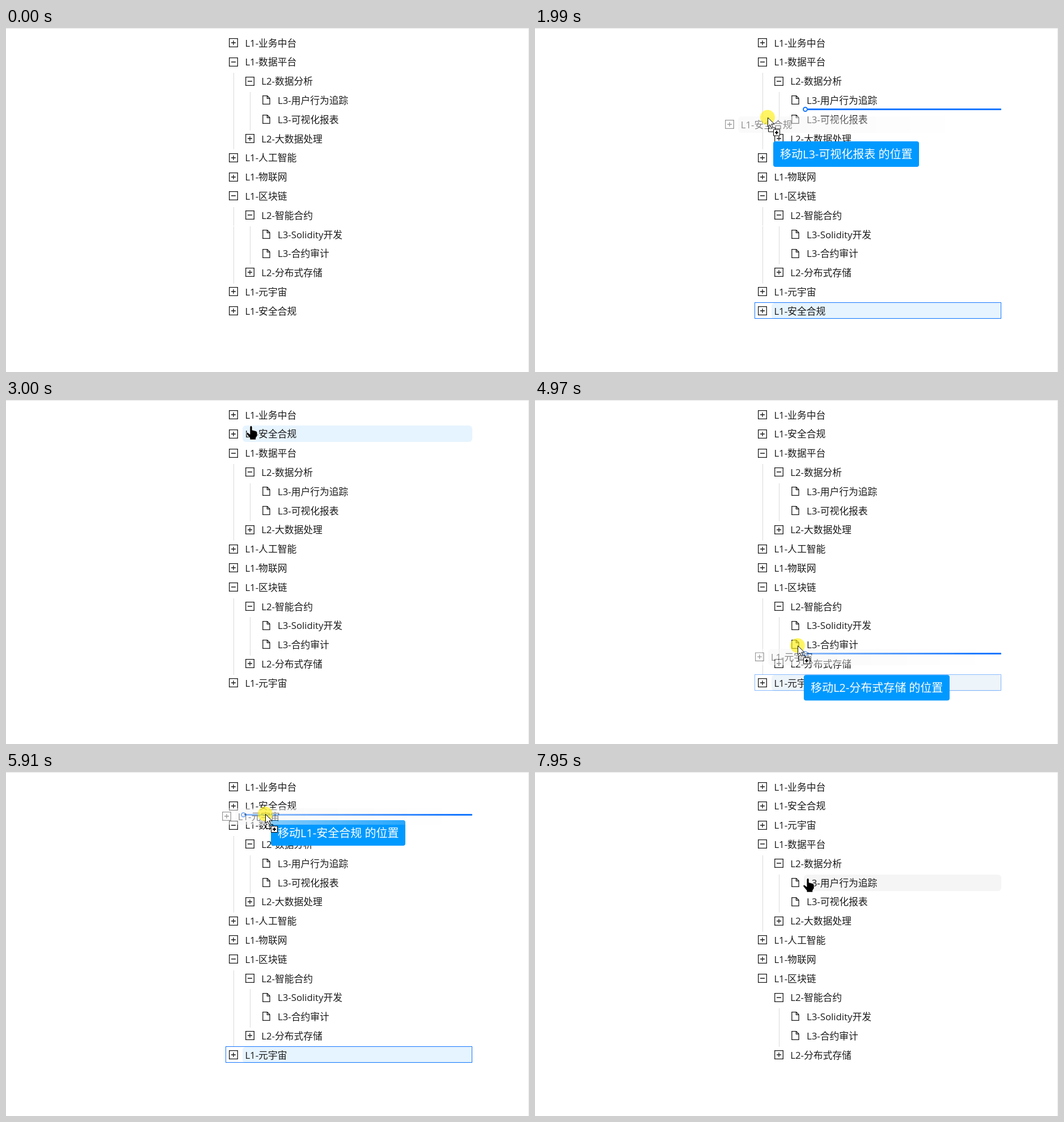
An HTML page that plays this animation: 922x607 px, repeating every 8 s.

```html
<!DOCTYPE html>
<html lang="zh-CN">
<head>
<meta charset="utf-8">
<title>Tree drag and drop</title>
<style>
html, body { margin: 0; width: 100%; height: 100%; overflow: hidden; background: #fff; }
#stage {
  position: relative; width: 922px; height: 607px; overflow: hidden; box-sizing: border-box;
  border-top: 1px solid #e4e4e4; border-right: 1px solid #e8e8e8;
  color: #1a1a1a; font: 16.8px/29px "Open Sans", "Noto Sans CJK SC", "Noto Sans CJK", sans-serif;
  white-space: nowrap;
}
#layer { position: absolute; left: 0; top: -1px; width: 922px; height: 607px; }
#layer div, #layer svg { position: absolute; }
.row { left: 387.6px; width: 434.4px; height: 33.79px; --in: calc(var(--d) * 28.8px); }
.title { left: calc(29px + var(--in)); right: 0; height: 29px; padding-left: 4.8px; border-radius: 6px; box-sizing: border-box; }
.icon { left: calc(5.9px + var(--in)); top: 6.4px; width: 16px; height: 16px; fill: none; stroke: #1a1a1a; stroke-width: 1.3; }
.guide { width: 1px; top: 0; height: 100%; background: #d9d9d9; }
#frame { left: 387px; top: 484px; width: 435px; height: 29px; box-sizing: border-box; border: 1px solid #1677ff; }
#line { height: 3px; right: 100px; background: #1677ff; border-radius: 1px; }
#line::before {
  content: ""; position: absolute; left: -8px; top: -3px; width: 5px; height: 5px;
  border: 2px solid #1677ff; border-radius: 50%;
}
#tip {
  left: 0; top: 0; height: 45px; padding: 0 12px; border-radius: 4px;
  background: #09f; color: #fff; font-size: 20px; line-height: 45px;
}
#ghost {
  left: -14px; top: -14.4px; width: 434px; height: 29px; background: #fff;
  -webkit-mask-image: radial-gradient(circle at 84px 14px, rgba(0,0,0,.56), transparent 340px);
  mask-image: radial-gradient(circle at 84px 14px, rgba(0,0,0,.56), transparent 340px);
}
#ghost .title { background: #f5f5f5; }
#spot { left: -13px; top: -13px; width: 26px; height: 26px; border-radius: 50%; background: rgba(255,240,20,.66); }
#cursor { left: 0; top: 0; width: 1px; height: 1px; overflow: visible; }
</style>
</head>
<body>
<div id="stage"><div id="layer">
  <div id="tree"></div>
  <div id="frame"></div>
  <div id="line"></div>
  <div id="tip"></div>
  <div id="ghost" class="row" style="--d:0"></div>
  <div id="spot"></div>
  <svg id="cursor">
    <g id="arrow" fill="#fff" stroke="#000">
      <path d="M.5 .5V16.5L4.2 13L6.8 19L9.4 17.9L6.9 12H12Z"/>
    </g>
    <g id="badge" fill="#fff" stroke="#000">
      <path fill="none" d="M4 18.5H1.5V25.5H10M10 18.5H13.5V21"/>
      <path d="M10.5 21.5h11v11h-11z"/>
      <path stroke-width="2" d="M13 27h6M16 24v6"/>
    </g>
    <path id="hand" stroke="#fff" stroke-width=".7"
      d="M-2 2Q-2 -.5 0 -.5Q2 -.5 2 2V7L8 8.5Q11 9.5 11 12V17L8.5 21V24H-2V21L-8 14Q-9 11 -6 11.3L-2 14.5Z"/>
  </svg>
</div></div>
<script>
const LOOP = 8000, PITCH = 33.79, MID = 26, INDENT = 28.8;
const $ = id => document.getElementById(id);

const ICONS = {
  '+': 'M.7 .7H15.3V15.3H.7ZM4 8H12M8 4V12',
  '-': 'M.7 .7H15.3V15.3H.7ZM4 8H12',
  'f': 'M1.8 .7H9.6L14 5.1V15.3H1.8ZM9.4 .7V5.3H14'
};
const cell = (icon, label) =>
  `<svg class="icon" viewBox="0 0 16 16"><path d="${ICONS[icon]}"/></svg><div class="title">${label}</div>`;

// depth, icon, label
const rows = `0+业务中台
0-数据平台
1-数据分析
2f用户行为追踪
2f可视化报表
1+大数据处理
0+人工智能
0+物联网
0-区块链
1-智能合约
2fSolidity开发
2f合约审计
1+分布式存储
0+元宇宙
0+安全合规`.split('\n').map(s => {
  const depth = +s[0], label = `L${depth + 1}-${s.slice(2)}`, el = document.createElement('div');
  el.className = 'row';
  el.style.setProperty('--d', depth);
  el.innerHTML = cell(s[1], label);
  for (let i = 0; i < depth; i++)
    el.insertAdjacentHTML('afterbegin', `<div class="guide" style="left:${13.4 + i * INDENT}px"></div>`);
  $('tree').append(el);
  return { depth, label, el, title: el.querySelector('.title'), root: el.querySelectorAll('.guide')[depth - 1] };
});

const move = (list, from, to) => {
  const out = [...list];
  out.splice(to, 0, ...out.splice(from, 1));
  return out;
};
const second = move(rows, 14, 1);
const orders = [rows, second, move(second, 14, 2)];
const drags = [
  { start: 1350, fade: 1560, drop: 3000, row: rows[14] },
  { start: 4760, fade: 4820, drop: 6170, row: rows[13] }
];

// each key: time, x, y
const pointer = [
  [120, 660, 612], [500, 560, 556], [880, 478, 512], [940, 478, 512], [1080, 471, 505], [1350, 471, 505],
  [1440, 458, 477], [1610, 420, 365], [1850, 408, 215], [2130, 412, 101], [2200, 415, 95], [2400, 431, 57],
  [2600, 432, 46], [3080, 432, 46], [3400, 440, 270], [3760, 462, 499], [3900, 470, 497], [4760, 470, 497],
  [4880, 467, 475], [4970, 463, 434], [5200, 442, 250], [5510, 447, 110], [5570, 449, 100], [5910, 457, 74],
  [6600, 457, 74], [6980, 445, 90], [7200, 440, 200], [7450, 530, 335], [7740, 490, 255], [7820, 484, 244],
  [7950, 481, 188]
];
const ghost = [
  [1350, 401, 499], [1470, 390, 470], [1610, 358, 399], [1850, 342, 240], [2130, 344, 101], [2400, 361, 50],
  [2600, 362, 40], [4760, 401, 499], [4880, 398, 485], [4970, 396, 454], [5200, 374, 270], [5510, 379, 118],
  [5570, 381, 105], [5910, 389, 78]
];
const tip = [
  [1640, 430, 405], [1850, 418, 270], [2130, 422, 131], [2400, 441, 81], [2600, 442, 71], [4850, 480, 510],
  [4970, 474, 486], [5200, 452, 300], [5510, 457, 125], [5570, 459, 118], [5910, 467, 85]
];

const clamp = v => Math.max(0, Math.min(1, v));
function at(keys, t) {
  let i = keys.findIndex(k => k[0] > t);
  if (i < 0) i = keys.length;
  const a = keys[Math.max(0, i - 1)], b = keys[Math.min(i, keys.length - 1)];
  const k = b[0] > a[0] ? clamp((t - a[0]) / (b[0] - a[0])) : 0;
  return [a[1] + (b[1] - a[1]) * k, a[2] + (b[2] - a[2]) * k];
}
const GREY = [245, 245, 245], BLUE = [230, 244, 255], WHITE = [255, 255, 255];
const mix = (a, b, k) => `rgb(${a.map((v, i) => Math.round(v + (b[i] - v) * k))})`;
const place = (id, [x, y]) => { $(id).style.transform = `translate(${x}px,${y}px)`; };
const show = (id, on) => { $(id).style.display = on ? '' : 'none'; };
const rowAt = y => Math.round((y - MID) / PITCH);

let shown = null;
function layout(order) {
  if (order === shown) return;
  shown = order;
  const lastRoot = order.map(r => r.depth).lastIndexOf(0);
  order.forEach((r, i) => {
    r.el.style.top = MID - 14.4 + i * PITCH + 'px';
    if (r.root) r.root.style.visibility = '';
    const base = r.el.querySelector('.guide[style*="13.4px"]');
    if (base) base.style.visibility = i > lastRoot ? 'hidden' : '';
  });
}

function draw(t) {
  const order = orders[drags.filter(d => t >= d.drop).length];
  layout(order);

  const pos = at(pointer, t), [x, y] = pos;
  const drag = drags.find(d => t >= d.start && t < d.drop);
  const under = order[rowAt(y)];
  const hover = under && x >= 416 + under.depth * INDENT && x < 822 ? under : null;

  rows.forEach(r => { r.title.style.background = !drag && r === hover ? mix(GREY, GREY, 0) : ''; });
  drags.forEach(d => {
    const k = (t - d.drop) / 250;
    if (k >= 0 && k < 1) d.row.title.style.background = mix(BLUE, d.row === hover ? GREY : WHITE, k);
  });

  const fade = drag ? clamp((t - drag.fade) / 300) : 0;
  const over = !!drag && t > drag.fade + 80;
  show('frame', fade > 0);
  show('line', over);
  show('tip', over);
  show('ghost', drag);
  show('spot', drag);
  if (drag) {
    drag.row.title.style.background = mix(GREY, BLUE, fade);
    $('frame').style.opacity = fade;
    place('ghost', at(ghost, t));
    place('spot', pos);
    const html = cell('+', drag.row.label);
    if ($('ghost').dataset.label !== drag.row.label) {
      $('ghost').dataset.label = drag.row.label;
      $('ghost').innerHTML = html;
    }
  }
  if (over) {
    const gap = Math.max(0, Math.min(14, Math.floor((y - MID) / PITCH)));
    $('line').style.top = Math.round(MID + gap * PITCH + 14.6) + 'px';
    $('line').style.left = 422 + order[gap].depth * INDENT + 'px';
    const p = at(tip, t), target = order[Math.max(0, Math.min(14, rowAt(p[1] - 24)))];
    const text = `移动${target.label} 的位置`;
    if ($('tip').textContent !== text) $('tip').textContent = text;
    place('tip', p);
  }

  place('cursor', pos);
  show('hand', !drag && hover);
  show('arrow', drag || !hover);
  show('badge', drag);
}

function tick() {
  draw(performance.now() % LOOP);
  requestAnimationFrame(tick);
}
tick();
</script>
</body>
</html>
```
